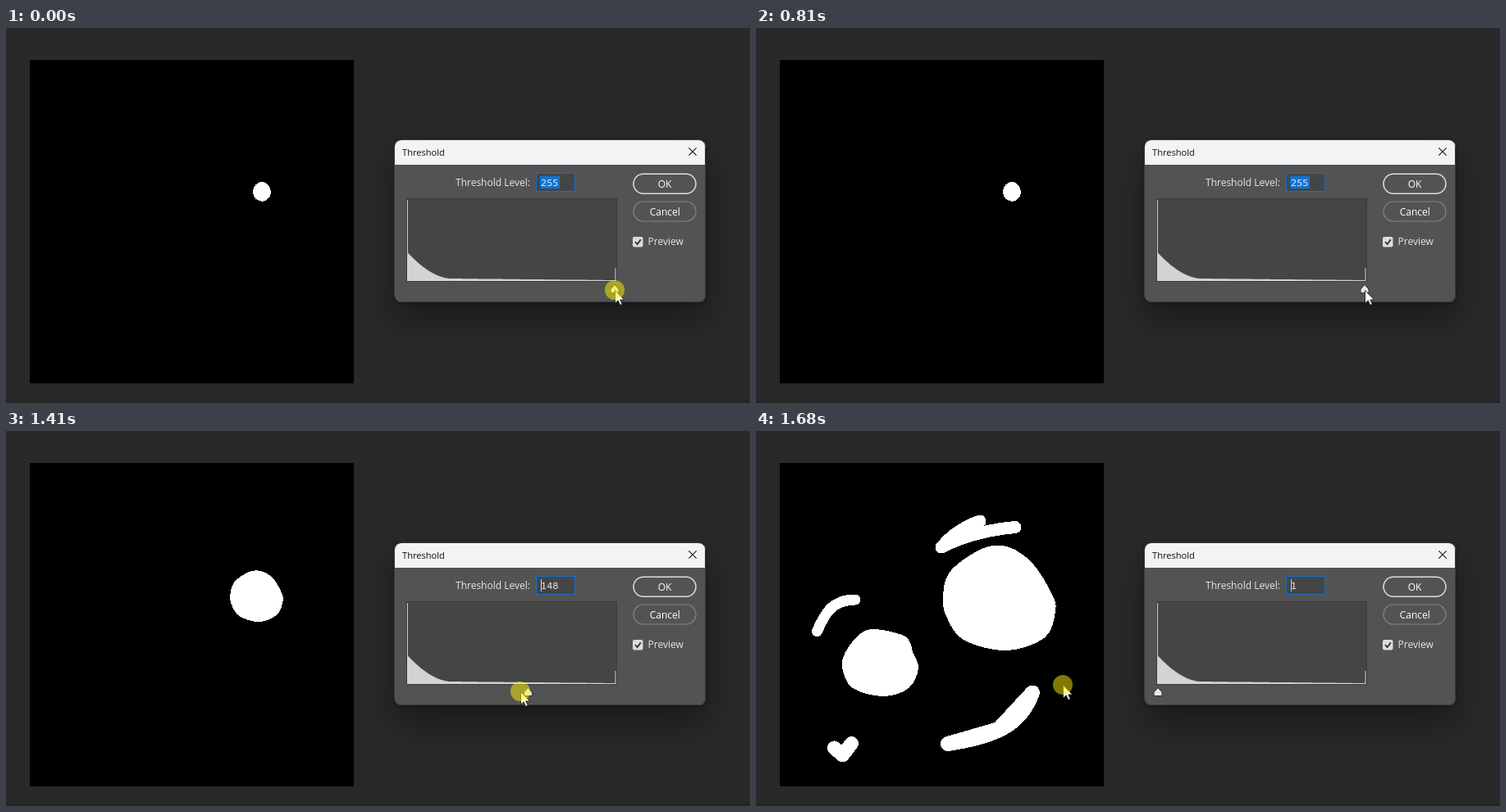
These frames come from a looping animation (907 px wide and 458 px high, 1.75 s). An HTML page:

```html
<!DOCTYPE html>
<html lang="en">
<head>
<meta charset="utf-8">
<title>Threshold dialog</title>
<style>
  html, body { margin: 0; width: 100%; height: 100%; overflow: hidden; background: #292929; }
  svg { position: absolute; left: 0; top: 0; display: block; }
  #shadow {
    position: absolute; left: 474px; top: 137px; width: 379px; height: 198px;
    border-radius: 8px; box-shadow: 0 20px 42px rgba(0, 0, 0, .38), 0 1px 5px rgba(0, 0, 0, .25);
  }
  text { font: 12px "Open Sans", "Noto Sans", sans-serif; fill: #e6e6e6; }
  .title { font-size: 11.1px; fill: #111; }
  .mid { text-anchor: middle; fill: #fff; }
  #level { font: 11.3px "DejaVu Sans", sans-serif; }
  #blobs { fill: #fff; shape-rendering: crispEdges; }
  .brush { fill: none; stroke: #fff; stroke-linecap: round; stroke-linejoin: round; }
</style>
</head>
<body>
<div id="shadow"></div>
<svg width="907" height="458" viewBox="0 0 907 458">
  <rect y="455" width="907" height="3" fill="#242424"/>
  <rect x="29" y="39" width="395" height="395"/>
  <g id="blobs">
    <path id="eye"/>
    <g id="rest">
      <path id="smallEye"/>
      <path class="brush" stroke-width="15" d="M226 142Q244 120 273 110M226 142Q265 122 316 117.5"/>
      <path class="brush" stroke-width="13" d="M74.5 244.5C83 225 92 206 121 206"/>
      <path class="brush" stroke-width="18" d="M337 319.5C324 355 300 372 234 382L296 364Z"/>
      <path class="brush" stroke-width="17" d="M95.5 387L105.5 396 116.5 381.5"/>
    </g>
  </g>

  <rect x="474" y="137" width="379" height="198" rx="8" fill="#535353"/>
  <path d="M474 167V145a8 8 0 0 1 8-8H845a8 8 0 0 1 8 8V167Z" fill="#f2f3f5"/>
  <rect x="473.5" y="136.5" width="379" height="198" rx="8" fill="none" stroke="#3c3c3c"/>
  <text class="title" x="483" y="156">Threshold</text>
  <path d="M832.3 146.3l9.4 9.4M841.7 146.3l-9.4 9.4" stroke="#111" stroke-width="1.1"/>

  <text x="548" y="193">Threshold Level:</text>
  <rect x="646.5" y="177.5" width="47" height="22" fill="#454545" stroke="#1a6fc4"/>
  <rect id="sel" x="651" y="181" width="24" height="15" fill="#0f74d4"/>
  <text id="level" x="652" y="193"></text>
  <path id="caret" d="M652.5 181V196" stroke="#d0d0d0"/>

  <rect x="488.5" y="208.5" width="256" height="101" fill="#454545" stroke="#3b3b3b"/>
  <path id="histogram" fill="#d1d3d4"/>
  <path d="M489.5 210V309M743 293V309" stroke="#d0d0d0"/>

  <rect x="765" y="178.2" width="76" height="24" rx="12" fill="none" stroke="#dedede" stroke-width="1.5"/>
  <text class="mid" x="803" y="195">OK</text>
  <rect x="765" y="212" width="76" height="24" rx="12" fill="none" stroke="#858585" stroke-width="1.2"/>
  <text class="mid" x="803.3" y="229">Cancel</text>
  <rect x="764" y="255" width="12.5" height="12.5" rx="2" fill="#dcdcdc"/>
  <path d="M767 261.2l2.6 2.8 4.2-5.6" fill="none" stroke="#333" stroke-width="1.8"/>
  <text x="782.5" y="265">Preview</text>

  <path id="thumb" d="M0 313.5L5 319V323.5H-5V319Z" fill="#e8e8e8" stroke="#2e2e2e"/>
  <g id="pointer">
    <path d="M.5 .5V16.2L4.2 12.8 6.7 18.4 9.2 17.3 6.8 11.9H11.6Z" fill="#fff" stroke="#111" stroke-width=".8"/>
    <circle id="halo" r="12" fill="#fff500" fill-opacity=".5"/>
  </g>
</svg>
<script>
const LOOP = 1750, COUNT = 26, FRAME = LOOP / COUNT;
const DRAG = 17;        // tick at which the thumb starts to follow
const LAG = .108;       // the dialog trails the pointer by part of a tick
const LEFT = 490, RIGHT = 742;

const $ = id => document.getElementById(id);
const clamp = (v, lo, hi) => Math.min(hi, Math.max(lo, v));
const show = (id, on) => { $(id).style.display = on ? '' : 'none'; };

// Outlines on a unit box
const roundish = [
  [-.24, -1], [.18, -1], [.6, -.68], [.94, -.09], [1, .24], [.81, .75],
  [.12, 1], [-.64, .79], [-.94, .34], [-1, 0], [-.94, -.41], [-.71, -.7]
];
const lumpy = [
  [-.14, -1], [.57, -.83], [.78, -.61], [.85, -.32], [1, .17], [.74, .76],
  [.08, 1], [-.72, .76], [-1, .15], [-.91, -.32], [-.55, -.84]
];

// Closed Catmull-Rom curve, scaled to a centre and radii
function blob(unit, cx, cy, rx, ry) {
  const p = unit.map(([x, y]) => [cx + x * rx, cy + y * ry]);
  const n = p.length, at = i => p[(i + n) % n];
  let d = 'M' + p[0];
  for (let i = 0; i < n; i++) {
    const [a, b, c, e] = [at(i - 1), at(i), at(i + 1), at(i + 2)];
    const c1 = b.map((v, k) => v + (c[k] - a[k]) / 6);
    const c2 = c.map((v, k) => v - (e[k] - b[k]) / 6);
    d += `C${c1} ${c2} ${c}`;
  }
  return d + 'Z';
}

// Grows as the level falls, from a disc to the lopsided outline
function eyeAt(level) {
  const g = 255 - level, soft = Math.max(0, 1 - level / 47), k = Math.min(1, g / 208);
  const unit = roundish.map(p => {
    const r = Math.hypot(...p);
    return p.map(v => v * (k + (1 - k) / r));
  });
  return blob(unit, 312 - .061 * g, 200 + .02 * g, 10.8 + .2 * g + 7 * soft, 12 + .178 * g + 6 * soft);
}

function histogram() {
  let d = 'M489 309';
  for (let x = 0; x <= 254; x++) {
    const h = 1 + 2.5 * (1 - x / 254) + 32 * Math.max(0, 1 - x / 53) ** 1.8;
    d += `L${489 + x} ${(309 - h).toFixed(1)}`;
  }
  return d + 'V309Z';
}

// A small sway and return, then a drag to the left that speeds up and settles
function pointerX(n) {
  const sway = 9 * clamp(Math.min(n / 5, (10 - n) / 3), 0, 1);
  const nudge = 2.4 * clamp(n - DRAG + 1, 0, 1);
  const drag = n < DRAG - 1 ? 0 : 374 / (1 + Math.exp(-1.15 * (n - 21.73)));
  return RIGHT - sway - nudge - drag;
}

const pointerY = n => 320 - 10 * clamp((n - 19) / 5, 0, 1) ** 2;

function draw(n) {
  const dragging = n >= DRAG;
  const thumb = dragging ? clamp(pointerX(n - LAG), LEFT, RIGHT) : RIGHT;
  const level = Math.round(1 + 254 * (thumb - LEFT) / (RIGHT - LEFT));
  $('level').textContent = level;
  $('eye').setAttribute('d', eyeAt(level));
  $('thumb').setAttribute('transform', `translate(${thumb} 0)`);
  $('pointer').setAttribute('transform', `translate(${Math.round(pointerX(n))} ${Math.round(pointerY(n))})`);
  show('sel', !dragging);
  show('caret', dragging);
  show('rest', level < 12);
  show('halo', n !== 12);   // released for one tick before the drag
}

$('smallEye').setAttribute('d', blob(lumpy, 151.5, 283, 46.5, 41));
$('histogram').setAttribute('d', histogram());

const start = performance.now();
let last = -1;
function tick() {
  const t = (performance.now() - start) % LOOP;
  const n = Math.min(COUNT - 1, Math.floor((t + 8) / FRAME));
  if (n !== last) draw(last = n);
  requestAnimationFrame(tick);
}
tick();
</script>
</body>
</html>
```
